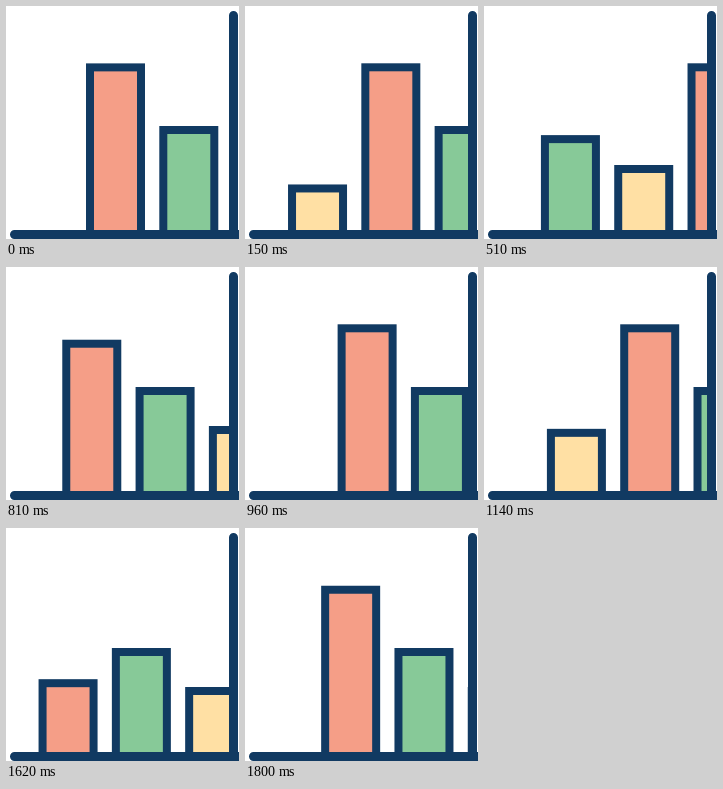
Write an HTML page with a canvas that moves like this. It is 233 px wide and 233 px high and loops after 1.83 s.

```html
<!DOCTYPE html>
<html lang="en">
<head>
<meta charset="utf-8">
<title>Moving bar chart</title>
<style>
  html, body { margin: 0; width: 100%; height: 100%; overflow: hidden; background: #fff; }
  canvas { display: block; width: 233px; height: 233px; }
</style>
</head>
<body>
<canvas id="stage" width="233" height="233"></canvas>
<script>
const ctx = document.getElementById('stage').getContext('2d');
const LOOP = 1830, STEP = 30;
const SPEED = 0.2422;          // px per ms
const GAP = 73.3, WIDTH = 59, LINE = 8;
const BASE = 228;
const GROW_FROM = 21, GROW_TO = 85;
const NAVY = '#113a62';
const BARS = [
  { color: '#f59e87', top: 57.3 },
  { color: '#ffe0a4', top: 159 },
  { color: '#87c998', top: 120 }
];

function growth(x) {
  const p = Math.min(1, Math.max(0, (x - GROW_FROM) / (GROW_TO - GROW_FROM)));
  return 1 - Math.pow(1 - p, 3);
}

function drawBar(x, bar) {
  const scale = growth(x);
  if (scale === 0) return;
  const top = BASE - (BASE - bar.top) * scale;
  ctx.fillStyle = NAVY;
  ctx.fillRect(x, top, WIDTH, BASE - top);
  const inner = BASE - top - LINE;
  if (inner > 0) {
    ctx.fillStyle = bar.color;
    ctx.fillRect(x + LINE, top + LINE, WIDTH - 2 * LINE, inner);
  }
}

function drawAxes() {
  ctx.strokeStyle = NAVY;
  ctx.lineWidth = 9;
  ctx.lineCap = 'round';
  ctx.beginPath();
  ctx.moveTo(8.5, 228.5);
  ctx.lineTo(233, 228.5);
  ctx.moveTo(227.5, 9.5);
  ctx.lineTo(227.5, 228.5);
  ctx.stroke();
}

function draw(t) {
  ctx.fillStyle = '#fff';
  ctx.fillRect(0, 0, 233, 233);
  ctx.save();
  ctx.beginPath();
  ctx.rect(0, 0, 228, BASE);
  ctx.clip();
  const lead = 80 + SPEED * t;
  for (let k = -2; k <= 7; k++) {
    const x = lead - k * GAP;
    if (x < 233) drawBar(x, BARS[(k + 3) % 3]);
  }
  ctx.restore();
  drawAxes();
}

const start = performance.now();
function tick() {
  const t = (performance.now() - start) % LOOP;
  draw(Math.floor(t / STEP) * STEP);
  requestAnimationFrame(tick);
}
tick();
</script>
</body>
</html>
```
